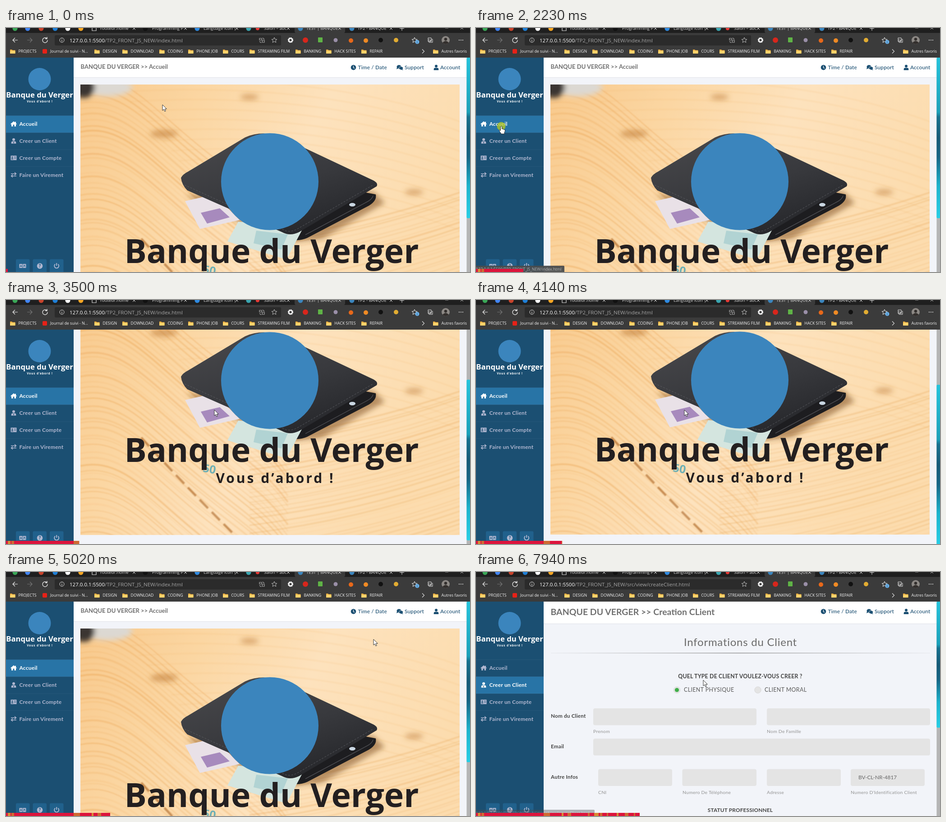
These frames come from a looping animation (1029 px wide and 544 px high, 8000 ms). An HTML page:

```html
<!DOCTYPE html>
<html lang="fr">
<head>
<meta charset="utf-8">
<title>Banque du Verger</title>
<style>
html, body { margin: 0; width: 100%; height: 100%; overflow: hidden; background: #3b3b3b; }
svg { display: block; width: 1029px; height: 544px; }
text { white-space: pre; font-family: Lato, sans-serif; }
.ui { font-family: "Open Sans", "Noto Sans", sans-serif; }
</style>
</head>
<body>
<svg id="stage" viewBox="0 0 1029 544" xmlns="http://www.w3.org/2000/svg"></svg>
<script>
const LOOP = 8000, NAVY = '#1b4f72', BLUE = '#2874a6', MUTED = '#b0b7d0';
const BANK = 'Banque du Verger', ROOT = '127.0.0.1:5500', DIR = '/TP2_FRONT_JS_NEW/';
const PAGES = ['index.html', 'src/view/createClient.html'];

let seed = 7;
const random = () => (seed = seed * 16807 % 2147483647) / 2147483647;

// SVG helpers
const text = (x, y, size, fill, str, more = '') =>
  `<text x="${x}" y="${y}" font-size="${size}" fill="${fill}" ${more}>${str}</text>`;
const ui = (x, y, size, fill, str, more = '') => text(x, y, size, fill, str, 'class="ui" ' + more);
const rect = (x, y, w, h, fill, rx = 0, more = '') =>
  `<rect x="${x}" y="${y}" width="${w}" height="${h}" fill="${fill}" rx="${rx}" ${more}/>`;
const circle = (x, y, r, fill, more = '') => `<circle cx="${x}" cy="${y}" r="${r}" fill="${fill}" ${more}/>`;
const ellipse = (x, y, rx, ry, fill, more = '') =>
  `<ellipse cx="${x}" cy="${y}" rx="${rx}" ry="${ry}" fill="${fill}" ${more}/>`;
const path = (d, fill, more = '') => `<path d="${d}" fill="${fill}" ${more}/>`;
const line = (d, color, width = 1, more = '') =>
  path(d, 'none', `stroke="${color}" stroke-width="${width}" ${more}`);
const at = (x, y, body, more = '') => `<g transform="translate(${x} ${y})" ${more}>${body}</g>`;
const bold = 'font-weight="700" ', middle = 'text-anchor="middle" ';
const spaced = n => `letter-spacing="${n}" `;

const star = 'M0-6L1.7-2 6-1.7 2.7 1 3.8 5.3 0 3-3.8 5.3-2.7 1-6-1.7-1.7-2Z';
const user = 'M-3-3a3 3 0 1 1 6 0a3 3 0 1 1-6 0M-5.3 6V4Q-5.3.8-2 .8H2Q5.3.8 5.3 4V6Z';
const card = 'M-6.5-5h13v10h-13z';

function folder(x) {
  return path(`M${x} 48h4l1.5 1.6h6v7.4h-11.5z`, '#e8a93c') + rect(x, 50.6, 11.5, 6.4, '#ffd36b', 1);
}

function tabs() {
  const titles = ['routeur.home', 'Programming P', 'Language Icon |', 'Salon – abc', 'TEST | BANQUE', 'TP2 - BANQUE'];
  const starts = [209, 324, 438, 572, 666, 780];
  const icons = [[20, '#3aa757'], [48, '#4285f4'], [78, '#c8432b'], [109, '#1f7fd6'], [137, '#fff'],
    [166, '#f5a623'], [309, '#111'], [424, '#2f8ae0'], [538, '#3aa6b0'], [558, '#e53935'], [653, '#3b85bd'], [767, '#3b85bd']];
  let out = rect(0, 0, 1029, 11, '#1f1f1f') + rect(640, -8, 112, 20, '#3b3b3b', 5);
  icons.forEach(([x, c]) => out += circle(x, 1, x === 558 ? 4 : 5.5, c));
  out += line('M191-3V6H200V-2', '#ddd', 1.2);
  titles.forEach((s, i) => {
    out += ui(starts[i], 4, 9.6, '#d5d5d5', s);
    const x = 284 + 114 * i;
    out += line(`M${x - 3}-2l6 6m0-6l-6 6`, '#ddd');
  });
  return out + line('M878-4V6M873 1H883', '#ddd') + line('M974 0h7M1008-3l6 6m0-6l-6 6', '#ccc');
}

function chrome() {
  const marks = [[9, 'PROJECTS'], [196, 'DESIGN'], [258, 'DOWNLOAD'], [340, 'CODING'], [404, 'PHONE JOB'],
    [481, 'COURS'], [540, 'STREAMING FILM'], [642, 'BANKING'], [710, 'HACK SITES'], [788, 'REPAIR'], [947, 'Autres favoris']];
  let out = rect(0, 0, 1029, 66, '#3b3b3b') + tabs() + rect(108, 16, 502, 23, '#2b2b2b', 3);
  out += line('M26 27H15m5-5l-5 5 5 5', '#eee', 1.2) + line('M47 27h11m-5-5l5 5-5 5', '#777', 1.2);
  out += line('M90 23a5.5 5.5 0 1 0 2 4M91 20v4h-4', '#eee', 1.3);
  out += circle(124, 27, 5, 'none', 'stroke="#ddd"') + line('M124 24v1m0 1.5v3.5', '#ddd', 1.2);
  out += `<text class="ui" x="141" y="31.5" font-size="11.5" fill="#fff">${ROOT}<tspan id="url" fill="#a5a5a5"></tspan></text>`;
  out += `<g id="translate">${line('M562 23h5v4h-5zM569 27h4v5h-5zM569 22l4 3M562 30l4 3', '#aaa', 1.2)}</g>`;
  out += at(595, 27, line(star, '#bbb')) + circle(631, 27, 4, 'none', 'stroke="#eee" stroke-width="3"');
  out += circle(631, 27, 5.5, 'none', 'stroke="#eee" stroke-width="1.5" stroke-dasharray="2 2.3"');
  out += circle(664, 27, 6, '#d8261c') + rect(692, 21, 10, 11, '#5fb346', 1) + circle(731, 27, 4.5, '#9a8fa8');
  out += circle(765, 28, 5, '#e8681a') + circle(798, 28, 5, '#f08a24') + circle(831, 27, 5, '#111') + circle(865, 27, 5, '#e2ac32');
  out += at(906, 27, line(star, '#eee')) + circle(912, 31, 4.5, '#6ab0e8') + ui(912, 33.5, 7, '#123', 'i', middle);
  out += line('M936 22h7v8h-7zM938 24v8h8v-7h-3M942 26v4m-2-2h4', '#ddd');
  out += circle(975, 27, 9, '#8c8884') + circle(975, 25, 3.2, '#332f2d') + path('M968 33Q975 25 982 33Q975 39 968 33', '#332f2d');
  [1005, 1009, 1013].forEach(x => out += circle(x, 27, 1, '#eee'));
  marks.forEach(([x, s]) => out += folder(x) + ui(x + 18.5, 55, 8.8, '#f4f4f4', s));
  out += rect(81, 47, 10, 10, '#e62117', 2) + ui(98, 55, 8.8, '#f4f4f4', 'Journal de suivi - N...');
  return out + line('M923 47.5l4.5 4.5-4.5 4.5', '#ddd', 1.2);
}

function sidebar() {
  const names = ['Accueil', 'Creer un Client', 'Creer un Compte', 'Faire un Virement'];
  const icons = [
    path('M-7 0L0-6 3-3.4V-5H5V-1.7L7 0 6 1 5 .2V5.5H1.5V1.5H-1.5V5.5H-5V.2L-6 1Z', 'currentColor'),
    path(user, 'currentColor') + path('M0 1l1.2 4H-1.2z', NAVY),
    path(card, 'currentColor') + circle(-3, -1.5, 1.5, NAVY) + rect(-5, 1, 4, 2, NAVY) + line('M1-2H5M1 1H5', NAVY),
    line('M-6-2.5H5M2-5.5L5.5-2.5 2 .5M6 2.5H-5M-2-.5L-5.5 2.5-2 5.5', 'currentColor', 1.5)
  ];
  let out = rect(0, 66, 150, 478, NAVY) + circle(74.5, 114, 25, '#3b85bd');
  out += ui(74.5, 155, 16.7, '#fff', BANK, bold + middle);
  out += ui(75, 166, 6.5, '#fff', 'Vous d’abord !', bold + middle + spaced(.9));
  names.forEach((s, i) => {
    const y = 195.5 + 37.8 * i;
    out += `<g class="nav">${rect(0, y, 150, 37.8, BLUE)}${line(`M0 ${y}H150`, '#ffffff', 1, 'opacity=".05"')}` +
      at(17, y + 18.5, icons[i]) + text(29.5, y + 22.8, 12, 'currentColor', s, bold + spaced(.2)) + '</g>';
  });
  [22, 59.5, 97].forEach(x => out += rect(x, 515.5, 30.5, 33, '#21618c', 3));
  out += rect(29.5, 526, 15, 9, MUTED, 1) + ui(31, 533, 6.5, '#21618c', 'A', bold) + line('M37 526v9M39 529h4m-2-1v1l-2 4m2-3l2 3', '#21618c');
  out += circle(75, 530.5, 6.3, MUTED) + ui(75, 534.3, 10, '#21618c', '?', bold + middle);
  return out + line('M109 526.5a5 5 0 1 0 6.4 0M112.2 524v6', MUTED, 1.9);
}

function header(bottom, size, y, title) {
  let out = rect(150, 66, 872, bottom - 66, '#fff') + rect(150, bottom, 872, 1, '#dfe1e8');
  out += text(165.5, y, size, '#707070', `${BANK.toUpperCase()} &gt;&gt; ${title}`, bold);
  out += circle(770.5, 88, 5.8, NAVY) + line('M770.5 84.5V88.5l2.5 1.5', '#fff', 1.2);
  out += ellipse(871.5, 86.5, 5, 4, NAVY) + path('M867 88l-1 4 4-2z', NAVY);
  out += ellipse(876, 89.5, 4.6, 3.6, NAVY, 'stroke="#fff" stroke-width=".7"') + path('M878 91l3 3-5-1z', NAVY) + at(954, 88, path(user, NAVY));
  [[780.5, 'Time / Date'], [884, 'Support'], [963, 'Account']].forEach(([x, s]) =>
    out += text(x, 92, 11.9, NAVY, s, 'font-weight="500" ' + spaced(.15)));
  return out;
}

function wood() {
  let grain = '';
  for (let i = 0; i < 48; i++) {
    const y = 110 + i * 13 + random() * 8, o = (.08 + random() * .3).toFixed(2);
    grain += line(`M165 ${y}c90-20 150 60 260 150s150 110 200 180`, '#e99a45', 1 + random() * 3, `opacity="${o}"`);
  }
  for (let i = 0; i < 34; i++) {
    const y = 440 + i * 10 + random() * 6, o = (.08 + random() * .25).toFixed(2);
    grain += line(`M540 ${y + 30}Q780 ${y} 1010 ${y - 80}`, '#e8a556', 1 + random() * 2.5, `opacity="${o}"`);
  }
  for (let i = 0; i < 12; i++) {
    const y = 120 + i * 22;
    grain += line(`M${240 + i * 18} ${y}Q700 ${y - 25} 1010 ${y + 90}`, '#f0b169', 3, 'opacity=".13"');
  }
  const blurred = grain + line('M300 470Q390 570 510 690', '#a85f1c', 5, 'stroke-dasharray="26 12" opacity=".6"');
  const knots = [[540, 154, 20, 6], [350, 236, 30, 9], [905, 366, 20, 6]]
    .map(k => ellipse(...k, '#b8722c', 'opacity=".5"')).join('');
  return rect(165, 126, 841, 561, 'url(#wood)') + `<g filter="url(#soft)">${blurred}</g><g filter="url(#blur)">` +
    ellipse(225, 132, 55, 20, '#dcd8d2') + ellipse(172, 132, 25, 24, '#3a3532') + knots +
    path('M400 372L610 480 700 470 840 390 815 365Z', '#80501f', 'opacity=".55"') + '</g>';
}

function wallet() {
  const notes = path('M397 386L462 371 518 428 430 448Z', '#e9e1e7') + path('M432 412l42-10 22 20-50 14z', '#a78abd') +
    at(447, 405, ui(0, 0, 21, '#8d66a5', '10', bold), 'style="rotate:-12deg"') +
    path('M515 432L662 440 622 516 491 476Z', '#d4e5df') + path('M555 452l70 8-14 34-62-14z', '#9fc9cc', 'opacity=".65"') +
    at(524, 462, ui(0, 0, 25, '#6eb0b5', '50', bold), 'style="rotate:10deg"');
  return path('M392 345L640 473Q655 474 668 468L805 396Q823 385 820 371L600 330Z', '#1d1d20') + notes +
    path('M388 334Q392 326 404 320L530 244Q560 230 600 238L815 340Q826 346 822 353L650 455Q630 465 612 455L402 362Q390 350 388 334Z', 'url(#leather)') +
    line('M396 350L620 452Q633 456 648 447L814 350', '#5a5b60', 1, 'stroke-dasharray="4 3"') +
    line('M664 461L800 388Q812 382 814 374', '#4a4a4e', 1.5) + ellipse(768, 394, 7, 4, '#c9d6e2');
}

function home() {
  return rect(150, 66, 872, 660, '#f2f4f9') + header(110, 13, 91, 'Accueil') +
    `<g clip-path="url(#photo)">${wood()}${wallet()}${circle(585, 342.5, 108, '#3b85bd')}</g>` +
    ui(589, 524, 73.4, '#231f20', BANK, bold + middle) +
    ui(597.5, 571, 30, '#231f20', 'Vous d’abord !', bold + middle + spaced(4));
}

function form() {
  const dark = '#444', soft = '#939393';
  let out = rect(150, 66, 872, 478, '#f2f4f9') + header(115, 19.5, 96, 'Creation CLient');
  out += text(586.5, 165, 24, '#6b6b6b', 'Informations du Client', middle + spaced(.75)) + rect(166, 180, 841, 1.3, 'url(#rule)');
  out += text(586, 237, 12.3, dark, 'QUEL TYPE DE CLIENT VOULEZ-VOUS CREER ?', bold + middle + spaced(.2));
  [445.5, 625].forEach(x => out += circle(x, 263, 7.2, '#e4e4e4', 'stroke="#d8d8d8"'));
  out += circle(445.5, 263, 4.6, '#3fae49');
  out += text(461, 267, 12.4, '#5a5a5a', 'CLIENT PHYSIQUE', spaced(.4)) + text(640, 267, 12.4, '#5a5a5a', 'CLIENT MORAL', spaced(.4));
  [[325, 'Nom du Client'], [392.5, 'Email'], [461, 'Autre Infos']].forEach(([y, s]) =>
    out += text(166, y, 11.7, dark, s, bold + spaced(.2)));
  [[260, 304, 362], [645, 304, 362], [260, 371.5, 747], [271, 439.5, 164], [457.5, 439.5, 164.5], [645, 439.5, 164], [831, 439.5, 164]]
    .forEach(([x, y, w]) => out += rect(x, y, w, 37.5, '#e4e4e4', 4));
  [[260, 358.5, 'Prenom'], [645, 358.5, 'Nom De Famille'], [271, 494.5, 'CNI'], [458, 494.5, 'Numero De Téléphone'],
    [645, 494.5, 'Adresse'], [831, 494.5, 'Numero D\'Identification Client']]
    .forEach(([x, y, s]) => out += text(x, y, 10.4, soft, s, spaced(.25)));
  return out + text(848, 461.5, 11.8, '#666', 'BV-CL-NR-4817') +
    text(586, 534.5, 11.8, dark, 'STATUT PROFESSIONNEL', bold + middle + spaced(.2));
}

function progress() {
  const patches = [[4, 6], [12, 6], [150, 14], [190, 4], [203, 8], [248, 4], [262, 10], [275, 5], [290, 3], [312, 4], [330, 8], [350, 3]];
  return rect(0, 537, 400, 7, '#dc143c') +
    patches.map(([x, w], i) => rect(x, 537, w, 7, i % 3 ? '#cf6a32' : '#d98a35')).join('');
}

const stops = list => list.map(([o, c, a = 1]) => `<stop offset="${o}" stop-color="${c}" stop-opacity="${a}"/>`).join('');
const gradient = (id, dir, list) => `<linearGradient id="${id}" ${dir}>${stops(list)}</linearGradient>`;
const clip = (id, body) => `<clipPath id="${id}">${body}</clipPath>`;

document.getElementById('stage').innerHTML = '<defs>' +
  gradient('wood', 'x2="1" y2=".35"', [[0, '#f8c98c'], [.3, '#fbd6a2'], [.6, '#fde2bd'], [1, '#fcdcae']]) +
  gradient('leather', 'x2=".6" y2="1"', [[0, '#4a4a4d'], [.6, '#38393d'], [1, '#27282c']]) +
  gradient('rule', '', [[0, '#999', .1], [.5, '#888'], [1, '#999', .1]]) +
  gradient('thumbFill', 'x2="0" y2="1"', [[0, '#25c4dc'], [.34, '#1ba0b9'], [.37, '#17718f'], [.5, '#155a77'], [.62, '#166585'], [.8, '#1cb4cd'], [1, '#27cfe6']]) +
  clip('view', rect(150, 66, 872, 478)) + clip('photo', rect(165, 126, 841, 561)) + clip('done', rect(0, 537, 0, 7, '#000', 0, 'id="doneBox"')) +
  '<filter id="soft"><feGaussianBlur stdDeviation="1.2"/></filter><filter id="blur"><feGaussianBlur stdDeviation="6"/></filter></defs>' +
  `<g clip-path="url(#view)"><g id="home">${home()}</g><g id="form">${form()}</g></g>` +
  rect(1021.5, 66, 8, 478, '#b5b5b5') + rect(1021.5, 66, 8, 358, 'url(#thumbFill)', 2, 'id="thumb"') +
  sidebar() + chrome() +
  `<g id="tip">${rect(-3, 530, 10, 17, '#4a4d50', 2, 'id="tipBox"')}${ui(0, 541, 8.7, '#b5b8ba', '', 'id="tipText"')}</g>` +
  `<g clip-path="url(#done)">${progress()}</g>` +
  '<g id="pointer">' + circle(0, 0, 9.5, '#b5c81e', 'id="click" opacity=".75"') +
  path('M0 0V13L3 10.2 5 15 7.2 14 5.2 9.4H9.3Z', '#fff', 'id="arrow" stroke="#222" stroke-width=".9"') +
  path('M-1.5 1Q0-1.5 1.5 1V6L3 5.5 4 7 6 6.5 7 8 8.5 8Q9 11 7 14V17H0L-4 11Q-5 8.5-3 8.5L-1.5 10Z', '#fff', 'id="hand" stroke="#222" stroke-width=".9"') + '</g>';

const el = id => document.getElementById(id);
const navs = [...document.querySelectorAll('.nav')];
const show = (node, on) => node.setAttribute('visibility', on ? 'visible' : 'hidden');
const ease = p => { p = Math.min(1, Math.max(0, p)); return p * p * (3 - 2 * p); };

// time, x, y of the pointer tip
const route = [[0, 347, 171], [100, 347, 171], [900, 150, 205], [1150, 56, 219], [2450, 56, 219], [3100, 462, 245],
  [4400, 462, 245], [5020, 815, 150], [5260, 830, 100], [5600, 970, 90], [5850, 930, 100], [6180, 430, 135],
  [6500, 140, 268], [6660, 70, 266], [6900, 70, 252], [7420, 70, 252], [7940, 504, 241], [8000, 504, 241]];

function pointerAt(t) {
  const i = Math.max(1, route.findIndex(k => k[0] > t));
  const [t0, x0, y0] = route[i - 1], [t1, x1, y1] = route[i];
  const p = ease((t - t0) / (t1 - t0));
  return [x0 + (x1 - x0) * p, y0 + (y1 - y0) * p];
}
const scrollAt = t => 164 * (ease((t - 3300) / 210) - ease((t - 4180) / 190));

function draw(t) {
  const page = t < 7380 ? 0 : 1, [x, y] = pointerAt(t);
  const row = (y - 195.5) / 37.8;
  const hover = x < 150 && row >= 0 && row < 4 ? Math.floor(row) : -1;
  const linked = hover >= 0 && row - hover < .8;

  show(el('home'), !page);
  show(el('form'), page);
  show(el('translate'), !page);
  el('url').textContent = DIR + PAGES[page];
  el('home').setAttribute('transform', `translate(0 ${-scrollAt(t)})`);
  el('thumb').setAttribute('y', 66 + .75 * scrollAt(t - 30));
  el('thumb').setAttribute('height', page ? 281 : 358);
  navs.forEach((nav, i) => {
    const lit = i === page || i === hover;
    nav.style.color = lit ? '#fff' : MUTED;
    show(nav.firstChild, lit);
  });

  const target = t < 5000 ? 0 : 1;
  el('tip').setAttribute('opacity', linked ? .95 : t > 7400 ? .4 : 0);
  el('tipBox').setAttribute('width', target ? 266 : 199);
  el('tipText').textContent = ROOT + DIR + PAGES[target];
  el('doneBox').setAttribute('width', 4 + .0452 * t);

  el('pointer').setAttribute('transform', `translate(${x} ${y})`);
  show(el('hand'), linked);
  show(el('arrow'), !linked);
  show(el('click'), (t > 2140 && t < 2360) || (t > 7140 && t < 7360));
}

function tick() {
  draw(performance.now() % LOOP);
  requestAnimationFrame(tick);
}
tick();
</script>
</body>
</html>
```
